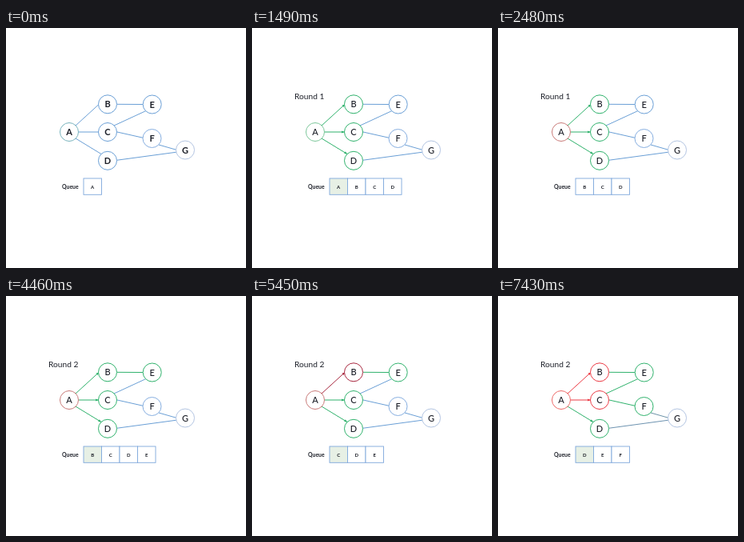
Animation, 300 px wide and 300 px high, one loop 8 s. Source, as an HTML page:

```html
<!DOCTYPE html>
<html lang="en">
<head>
<meta charset="utf-8">
<title>Breadth-first search</title>
<style>
html, body { margin: 0; height: 100%; overflow: hidden; background: #fff; }
svg { display: block; width: 100vw; height: 100vh; }
text { font-family: Lato, Inter, sans-serif; fill: #1c1f28; }
</style>
</head>
<body>
<svg id="stage" viewBox="0 0 300 300"></svg>
<script>
const LOOP = 8000, FIRST = 500, STEP = 990;
const BLUE = '#6a9fd6', GREEN = '#2fb26c', RED = '#ec3a44', DARK_RED = '#a8283f';

// Each paint list holds [step, colour]; the latest one reached applies.
const nodes = {
  A: [79, 130, [[0, '#78b3bd'], [1, '#7cc79a'], [3, '#c97a78'], [7, '#ee6a68']]],
  B: [127, 95.3, [[0, BLUE], [2, GREEN], [6, DARK_RED], [8, RED]]],
  C: [127, 130, [[0, BLUE], [2, GREEN], [8, RED]]],
  D: [127, 165.8, [[0, BLUE], [2, GREEN]]],
  E: [182.7, 95.5, [[0, BLUE], [5, GREEN]]],
  F: [182.5, 138, [[0, '#86aee0'], [7, GREEN]]],
  G: [224, 152.5, [[0, '#b3c5e2']]]
};
const edges = [
  [87, 122, 116, 95.5, [[0, BLUE], [2, GREEN], [6, DARK_RED], [8, RED]], true],
  [91, 130, 115.5, 130, [[0, BLUE], [2, GREEN], [8, RED]], true],
  [87, 138, 119, 157.5, [[0, BLUE], [2, GREEN]], true],
  [139, 95.3, 171, 95.5, [[0, BLUE], [5, GREEN]]],
  [135, 122, 175, 103.5, [[0, BLUE], [7, GREEN]]],
  [139, 130, 171, 137.2, [[0, BLUE], [7, GREEN]]],
  [191, 146, 213, 152.3, [[0, BLUE], [7, '#6d93a8']]],
  [139, 165.2, 213, 155.2, [[0, BLUE], [7, '#6d93b0']]]
];
const queues = ['A', 'A', 'ABCD', 'BCD', 'BCD', 'BCDE', 'CDE', 'CDEF', 'DEF'];

const paintAt = (list, step) => list.filter(p => p[0] <= step).pop()[1];

const text = (x, y, size, str, extra = '') =>
  `<text x="${x}" y="${y}" font-size="${size}" ${extra}>${str}</text>`;

function edge([x1, y1, x2, y2, paint, arrow], step) {
  const colour = paintAt(paint, step);
  const angle = Math.atan2(y2 - y1, x2 - x1) * 180 / Math.PI;
  const head = arrow && step > 1
    ? `<path d="M0 0L-3.5-1.6V1.6Z" fill="${colour}" transform="translate(${x2} ${y2}) rotate(${angle})"/>` : '';
  return `<path d="M${x1} ${y1}L${x2} ${y2}" stroke="${colour}"/>` + head;
}

function node([name, [x, y, paint]], step) {
  return `<circle cx="${x}" cy="${y}" r="11.5" fill="#fff" stroke="${paintAt(paint, step)}"/>` +
    text(x, y + 4, 11, name, `text-anchor="middle" font-weight="${step ? 500 : 700}"`);
}

function cell(name, i, step) {
  const x = 97 + i * 22.5;
  const shaded = i === 0 && step !== 0 && step !== 3;
  return `<rect x="${x}" y="188" width="22.5" height="20.3" fill="${shaded ? '#e7f0e5' : '#fff'}" stroke="#7fa8dc" stroke-width=".9"/>` +
    text(x + 11.2, 200.5, 6, name, 'text-anchor="middle" font-weight="700"');
}

function render(step) {
  stage.innerHTML =
    (step ? text(53, 88.5, 10.2, 'Round ' + (step < 4 ? 1 : 2)) : '') +
    edges.map(e => edge(e, step)).join('') +
    Object.entries(nodes).map(n => node(n, step)).join('') +
    (step === 7 ? text(202, 100, 6.9, 'visited') : '') +
    text(70, 200.6, 6.9, 'Queue', 'font-weight="700"') +
    [...queues[step]].map((name, i) => cell(name, i, step)).join('');
}

const stage = document.getElementById('stage');
let shown = -1;
function tick() {
  const t = performance.now() % LOOP;
  const step = t < FIRST ? 0 : 1 + Math.floor((t - FIRST) / STEP);
  if (step !== shown) render(shown = step);
  requestAnimationFrame(tick);
}
tick();
</script>
</body>
</html>
```
